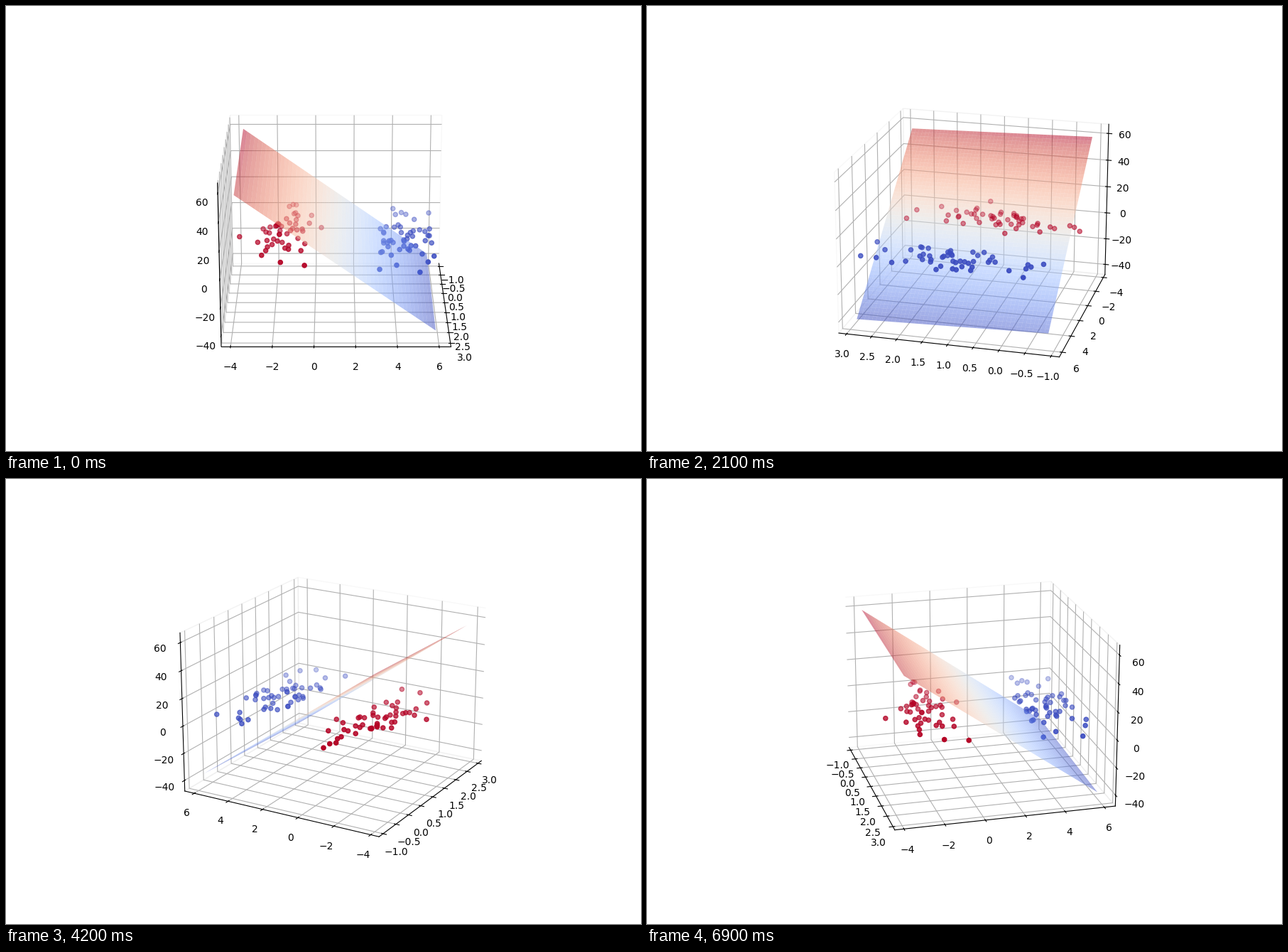
A matplotlib script for the animation above (7.2 s loop, 894 px wide and 626 px high).

```python
import numpy as np
import matplotlib.pyplot as plt
from matplotlib.animation import FuncAnimation

FRAMES = 24
INTERVAL = 300
ELEV = 20
PER_CLASS = 50
SPREAD = 0.8

# Two Gaussian blobs in 3D
rng = np.random.RandomState(0)
centers = rng.uniform(-10, 10, size=(2, 3))
points = np.vstack([rng.normal(c, SPREAD, size=(PER_CLASS, 3)) for c in centers])
labels = np.repeat([0, 1], PER_CLASS)
px, py, pz = points.T


def plane(x, y):
    """Height of the separating plane."""
    return 21.2 - 1.14 * x - 9.98 * y


def padded(values):
    """Data range with a 5 % margin plus the usual 3D pane offset."""
    lo, hi = np.min(values), np.max(values)
    mid, half = (lo + hi) / 2, (hi - lo) / 2 * 1.1 * 25 / 24
    return mid - half, mid + half


gx, gy = np.meshgrid(np.linspace(px.min(), px.max(), 50),
                     np.linspace(py.min(), py.max(), 50))
gz = plane(gx, gy)

fig = plt.figure(figsize=(8.94, 6.26), dpi=100)
ax = fig.add_subplot(projection="3d")
ax.scatter(px, py, pz, c=labels, cmap="coolwarm")
ax.plot_surface(gx, gy, gz, cmap="coolwarm", alpha=0.5)

ax.set_xlim(padded(px))
ax.set_ylim(padded(py))
ax.set_zlim(padded(gz))
for axis in (ax.xaxis, ax.yaxis, ax.zaxis):
    axis.pane.set_fill(False)


def update(i):
    ax.view_init(elev=ELEV, azim=i * 360 / FRAMES)
    return []


anim = FuncAnimation(fig, update, frames=FRAMES, interval=INTERVAL,
                     init_func=lambda: update(0), repeat=True, repeat_delay=0)
plt.show()
```
